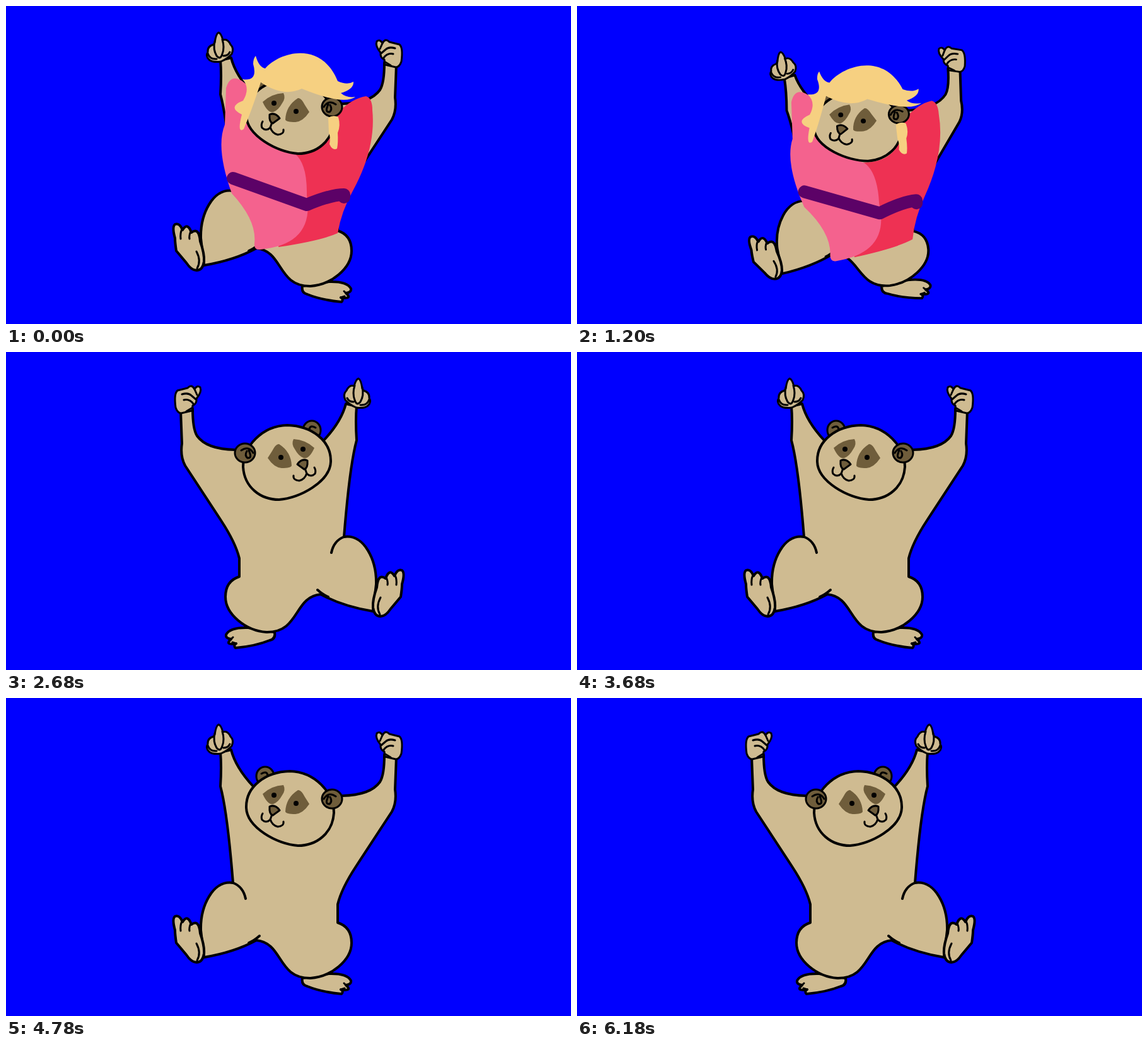
Write an HTML page without scripts that moves like this. It is 896 px wide and 504 px high and loops after 6380 ms.

```html
<!DOCTYPE html>
<html lang="en">
<head>
<meta charset="utf-8">
<title>Dancing bear</title>
<style>
  @property --beat { syntax: "<integer>"; inherits: true; initial-value: 0; }
  @property --turn { syntax: "<integer>"; inherits: true; initial-value: 0; }
  @property --period { syntax: "<integer>"; inherits: true; initial-value: 3; }

  html, body { margin: 0; width: 100%; height: 100%; overflow: hidden; background: #00f; }
  svg { display: block; width: 100vw; height: 100vh; }

  .ink { stroke: #000; stroke-width: 4; stroke-linecap: round; stroke-linejoin: round; }
  .thin { stroke-width: 3; }
  .line { fill: none; }
  .fur { fill: #cfbb91; }
  .dark { fill: #6f5d3b; }
  .pink { fill: #f4628e; }
  .red { fill: #ee3153; }
  .hair { fill: #f6d081; }
  .sash { fill: none; stroke: #5c0267; stroke-width: 20; stroke-linecap: round; stroke-linejoin: round; }

  /* The bear turns round every --period beats and leans further on each beat between.
     --turn is an integer, so the division rounds. */
  #bear {
    --turn: calc((var(--beat) - var(--period) / 2 + 0.5) / var(--period));
    --lean: calc(var(--beat) - var(--period) * var(--turn));
    transform-origin: 448px 0;
    transform: scaleX(cos(var(--turn) * 180deg));
    animation: tempo 6380ms infinite, undress 6380ms step-end infinite;
  }
  .squash {
    transform-origin: 604px 258px;
    transform: rotate(calc(var(--lean) * -2.1deg)) scaleY(calc(1 - var(--lean) * 0.025));
  }
  .tilt {
    transform-origin: 674px 275px;
    transform: rotate(calc(var(--lean) * -1.95deg));
  }
  .outfit { opacity: calc(var(--period) - 1); }

  @keyframes tempo {
    0% { --beat: 0; animation-timing-function: steps(6); }
    9.404% { --beat: 6; animation-timing-function: steps(6); }
    16.927% { --beat: 12; animation-timing-function: steps(6); }
    22.57% { --beat: 18; animation-timing-function: steps(6); }
    26.332% { --beat: 24; animation-timing-function: steps(2); }
    57.68% { --beat: 26; animation-timing-function: steps(9); }
    71.786% { --beat: 35; animation-timing-function: steps(9); }
    100% { --beat: 44; }
  }
  @keyframes undress {
    0% { --period: 3; }
    26.332%, 100% { --period: 1; }
  }
</style>
</head>
<body>
<svg viewBox="0 0 896 504">
  <g id="bear">

    <g class="squash">
      <g id="back-foot">
        <path class="ink fur" d="M470 444Q468 455 478 457Q500 466 532 469Q536 465 531 462Q550 465 539 455Q548 454 547 448Q541 436 512 437Z"/>
        <path class="ink thin line" d="M531 462L537 460M539 455L536 452"/>
      </g>

      <g id="body">
        <path class="ink fur" d="M340 86Q342 108 340 140Q351 180 360 293C328 288 308 330 309 368L314 411Q362 403 397 384C440 388 430 445 483 444C515 442 548 416 548 388Q548 363 526 356V327Q532 302 555 267T612 180Q620 165 617 145L619 93L600 90Q600 122 593 133Q578 154 533 155L392 140Q364 110 357 82Z"/>
        <path class="ink line" d="M360 293Q376 299 380 318M385 388Q393 385 402 377"/>
      </g>

      <g id="front-foot">
        <path class="ink fur" d="M302 419Q294 419 286 407L270 388Q268 375 268 368Q263 350 268 346Q275 343 280 355Q288 342 294 359Q306 350 308 373Q315 393 314 405Q312 419 302 419Z"/>
        <path class="ink thin line" d="M279 354Q276 360 277 369M293 357Q290 364 291 369M302 389Q310 404 303 416"/>
      </g>

      <g id="pointing-hand">
        <path class="ink thin fur" d="M331 58Q333 44 337 42Q341 43 344 54Q351 51 356 61Q362 67 358 76Q352 83 341 88Q328 90 322 85Q316 79 320 73Q319 64 329 61Z"/>
        <path class="ink thin line" d="M331 56Q328 69 334 79Q340 86 343 76Q347 66 343 53M320 75Q323 85 334 84M345 79Q352 79 355 73"/>
      </g>

      <g id="fist">
        <path class="ink thin fur" d="M594 74Q585 63 588 56Q593 52 597 59Q602 50 608 57L624 61Q630 66 627 88Q624 97 618 97L601 93L600 85Q593 82 594 74Z"/>
        <path class="ink thin line" d="M597 59L593 68M617 67Q607 64 602 69L595 75M614 76Q605 74 599 82M600 88L610 94"/>
      </g>
    </g>

    <g class="outfit tilt">
      <path class="red" d="M456 233Q495 236 512 210L527 168Q550 146 571 143Q581 146 581 165Q587 225 550 293Q532 325 526 360Q500 372 432 382Z"/>
      <path class="pink" d="M349 130Q358 100 386 129L383 175Q410 216 458 234Q478 250 477 300Q490 378 403 386Q393 387 394 376Q398 340 358 297Q332 225 347 188Z"/>
      <path class="sash" d="M360 273L477 315Q515 299 536 299V303"/>
    </g>

    <g class="squash">
      <g id="head">
        <ellipse class="ink thin dark" cx="411" cy="124" rx="14" ry="15"/>
        <path class="ink thin line" d="M405 120Q413 115 415 122Q414 128 409 128"/>
        <path class="ink fur" d="M381 174C380 140 412 117 450 116C490 117 520 150 520 182C518 215 492 234 463 234C430 232 382 205 381 174Z"/>
        <ellipse class="ink thin dark" cx="517" cy="160" rx="16" ry="15"/>
        <path class="ink thin line" d="M504 160Q511 148 523 156M511 156Q505 169 513 168Q518 164 514 157"/>
      </g>

      <g id="face">
        <path class="dark" d="M407 152Q421 139 440 138Q444 146 438 154Q432 165 424 168Q415 170 407 152Z"/>
        <path class="dark" d="M463 146Q468 145 474 157L481 168Q471 183 459 184Q444 184 443 180Q444 158 463 146Z"/>
        <circle cx="425" cy="154" r="4"/>
        <circle cx="460" cy="167" r="4"/>
        <path class="ink thin dark" d="M418 172Q427 168 434 178L423 186Q417 184 418 172Z"/>
        <path class="ink thin line" d="M421 187L419 193Q412 199 406 193Q404 188 407 183M419 192Q422 202 431 204Q441 203 440 196"/>
      </g>

      <g class="outfit hair">
        <path d="M396 79Q401 97 411 99C435 72 500 55 526 119Q541 126 551 120Q552 132 531 138Q540 146 554 144Q535 158 469 131Q440 145 404 121Q393 155 384 178L377 195Q366 203 374 172Q350 160 376 150Q388 130 375 116Q400 120 392 92Q392 83 396 79Z"/>
        <path d="M511 177Q519 172 527 176Q531 190 526 201Q527 216 525 226Q518 230 513 219Q515 208 512 201Z"/>
      </g>
    </g>

  </g>
</svg>
</body>
</html>
```
